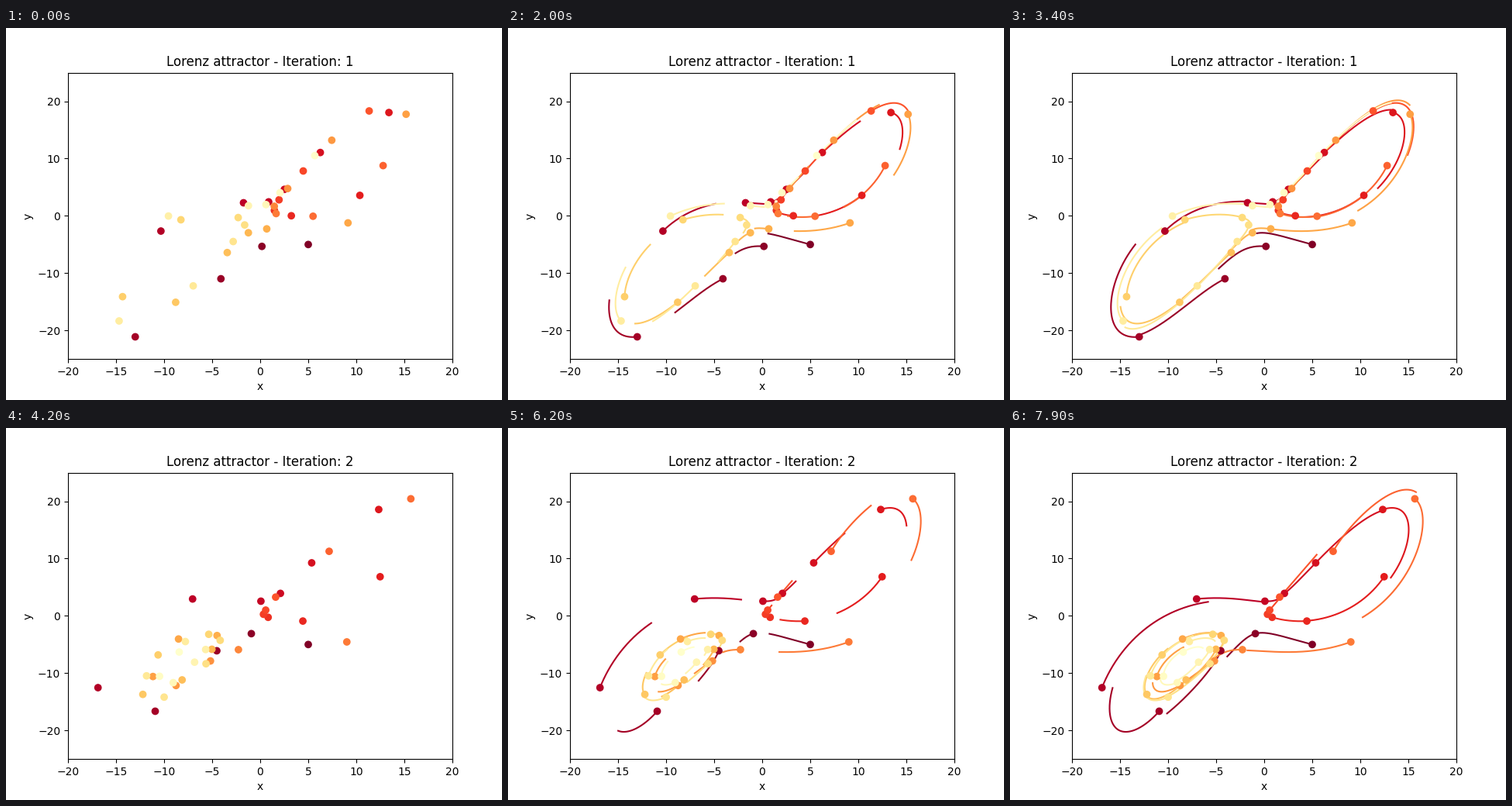
Animation of 640 by 480 pixels, one loop 8 s. Source, as a matplotlib script:

```python
import numpy as np
import matplotlib.pyplot as plt
from matplotlib.animation import FuncAnimation

SIGMA, RHO, BETA = 10, 28, 8 / 3
T, N = 5, 40          # time span, number of slices
DT = T / N
GROW, STRIDE = 36, 7  # growth steps per iteration, fine steps per growth step
FINE = GROW * STRIDE
SECOND = 42           # step at which iteration 2 begins
STEPS = 80


def lorenz(u):
    x, y, z = u
    return np.array([SIGMA * (y - x), x * (RHO - z) - y, x * y - BETA * z])


def rk4(u, h):
    k1 = lorenz(u)
    k2 = lorenz(u + h / 2 * k1)
    k3 = lorenz(u + h / 2 * k2)
    k4 = lorenz(u + h * k3)
    return u + h / 6 * (k1 + 2 * k2 + 2 * k3 + k4)


def coarse(u):
    return rk4(u, DT)


def fine_paths(starts):
    """Integrate all slices at once; shape (FINE + 1, 3, N)."""
    path = [starts.T]
    for _ in range(FINE):
        path.append(rk4(path[-1], DT / FINE))
    return np.array(path)


def parareal():
    """Slice starts and fine paths for the iterations that are shown."""
    u = [np.array([5.0, -5.0, 20.0])]
    for _ in range(N - 1):
        u.append(coarse(u[-1]))
    first = np.array(u)
    paths = fine_paths(first)
    u = [first[0]]
    for n in range(N - 1):
        u.append(paths[-1, :, n] + coarse(u[n]) - coarse(first[n]))
    second = np.array(u)
    return [first, second], [paths, fine_paths(second)]


starts, paths = parareal()
colors = plt.get_cmap("YlOrRd_r")(np.linspace(0, 1, N))

fig, ax = plt.subplots(figsize=(6.4, 4.8), dpi=100)
ax.set(xlim=(-20, 20), ylim=(-25, 25), xlabel="x", ylabel="y")
title = ax.set_title("")
lines = [ax.plot([], [], color=c)[0] for c in colors]
dots = ax.scatter(starts[0][:, 0], starts[0][:, 1], c=colors, zorder=3)


def update(step):
    it = int(step >= SECOND)
    grown = step - SECOND - 1 if it else step
    title.set_text(f"Lorenz attractor - Iteration: {it + 1}")

    end = min(max(grown, 0), GROW) * STRIDE + 1
    for n, line in enumerate(lines):
        line.set_data(paths[it][:end, 0, n], paths[it][:end, 1, n])

    # once the paths are done, the corrected starts join the old ones
    shown = starts if grown > GROW else [starts[it]]
    dots.set_offsets(np.vstack(shown)[:, :2])
    dots.set_facecolors(np.vstack([colors] * len(shown)))
    dots.set_edgecolors("face")
    return [title, dots, *lines]


anim = FuncAnimation(fig, update, frames=STEPS, interval=100,
                     repeat=True, repeat_delay=0, blit=False)
plt.show()
```
